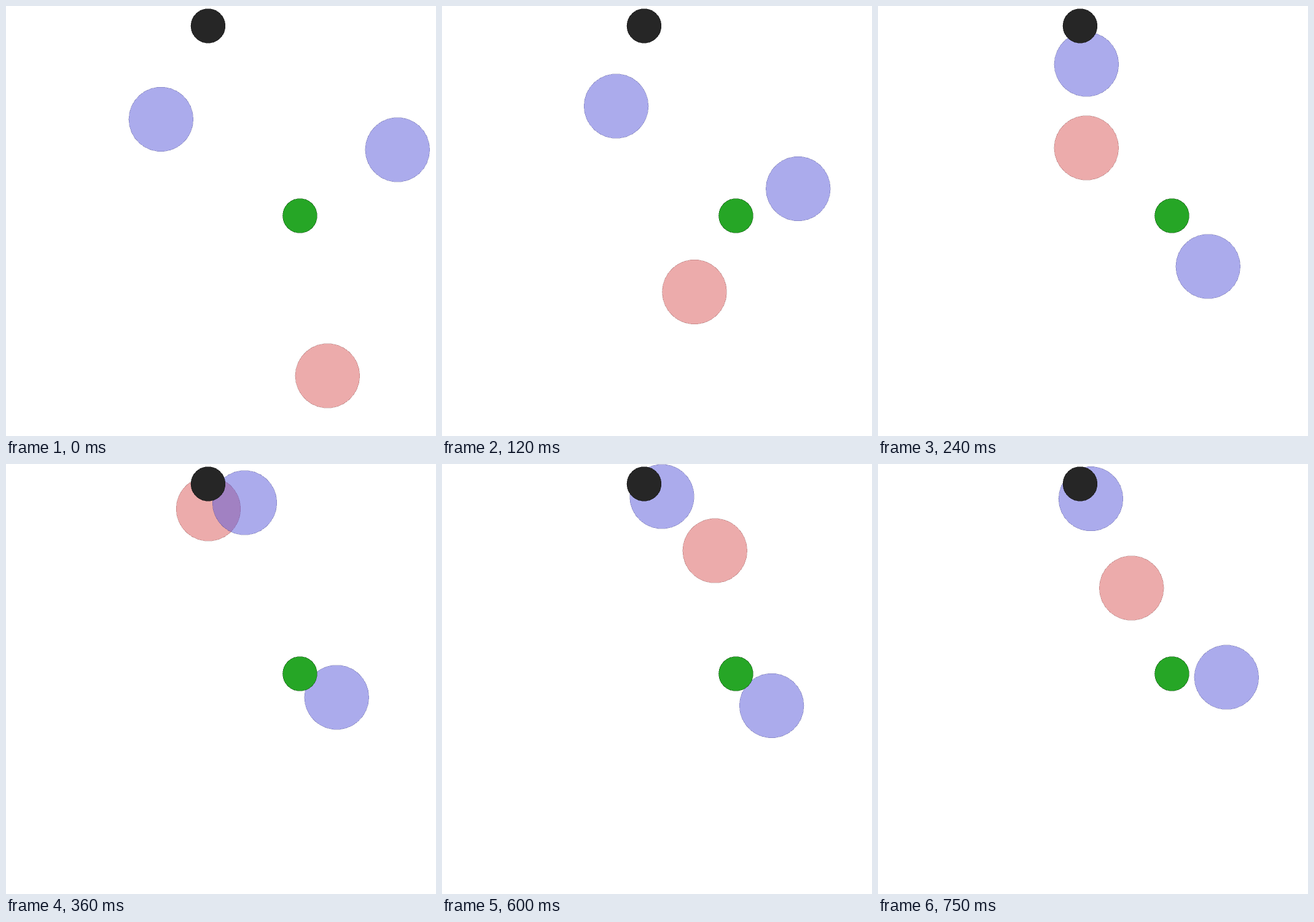
An HTML page for the animation above (780 ms loop, 700 by 700 pixels).

```html
<!DOCTYPE html>
<html lang="en">
<head>
<meta charset="utf-8">
<title>Agents and landmarks</title>
<style>
html, body { margin: 0; width: 100%; height: 100%; overflow: hidden; background: #fff; }
svg { display: block; width: 700px; height: 700px; }
</style>
</head>
<body>
<svg id="stage" viewBox="0 0 700 700" shape-rendering="crispEdges"></svg>
<script>
const stage = document.getElementById('stage');
const STEP_MS = 30, STEPS = 26, SIDES = 30;
const RED = [217, 89, 89], BLUE = [89, 89, 217], BLACK = [38, 38, 38], GREEN = [38, 166, 38];

// Disc with a rim of half the colour and half the opacity
function disc(r, color, alpha) {
  const el = document.createElementNS('http://www.w3.org/2000/svg', 'polygon');
  const corners = Array.from({ length: SIDES }, (_, i) => {
    const t = 2 * Math.PI * i / SIDES;
    return [r * Math.cos(t), r * Math.sin(t)];
  });
  const attrs = {
    points: corners.join(' '),
    fill: `rgb(${color})`, 'fill-opacity': alpha,
    stroke: `rgb(${color.map(c => c >> 1)})`, 'stroke-opacity': alpha / 2
  };
  for (const name in attrs) el.setAttribute(name, attrs[name]);
  stage.append(el);
  return (x, y) => el.setAttribute('transform', `translate(${x} ${y})`);
}

// Smooth curve through (t, p): nearly at rest at first, no force at the end
function spline(t, p) {
  const n = t.length - 1;
  const h = t.slice(1).map((v, i) => v - t[i]);
  const d = h.map((v, i) => (p[i + 1] - p[i]) / v);
  const m = [d[0] / 4, ...d];
  for (let pass = 0; pass < 40; pass++) {
    for (let i = 1; i < n; i++) {
      const a = h[i - 1], b = h[i];
      m[i] = (3 * (b * d[i - 1] + a * d[i]) - b * m[i - 1] - a * m[i + 1]) / (2 * (a + b));
    }
    m[n] = (3 * d[n - 1] - m[n - 1]) / 2;
  }
  return time => {
    let i = 0;
    while (i < n - 1 && time >= t[i + 1]) i++;
    const s = (time - t[i]) / h[i], r = 1 - s;
    return p[i] * r * r * (1 + 2 * s) + p[i + 1] * s * s * (1 + 2 * r)
      + h[i] * s * r * (m[i] * r - m[i + 1] * s);
  };
}

// Key points: step, x, y
function agent(color, ...keys) {
  const column = k => keys.map(key => key[k]);
  const x = spline(column(0), column(1)), y = spline(column(0), column(2));
  const place = disc(52.5, color, 0.5);
  return step => place(x(step), y(step));
}

const agents = [
  agent(RED, [0, 523.4, 602], [4, 411, 465.5], [8, 339.3, 231], [12, 329.5, 73],
    [16, 389.5, 65.5], [20, 444.3, 141.2], [25, 412.7, 202]),
  agent(BLUE, [0, 252.4, 184.4], [4, 283.6, 163], [8, 339.4, 95], [12, 388.5, 63],
    [16, 375, 75], [20, 358, 53], [23, 339, 52.5], [25, 346.5, 56.7]),
  agent(BLUE, [0, 637.3, 234], [4, 579.8, 297.5], [8, 537.3, 424], [12, 538.3, 379.8],
    [16, 535.4, 361.7], [20, 536.6, 393.4], [25, 567.4, 347.2])
];
disc(28, BLACK, 1)(329, 32.4);
disc(28, GREEN, 1)(478.5, 341.5);

let start;
function tick(now) {
  start ??= now;
  const step = Math.floor(Math.max(0, now - start) / STEP_MS + 0.001) % STEPS;
  agents.forEach(move => move(step));
  requestAnimationFrame(tick);
}
agents.forEach(move => move(0));
requestAnimationFrame(tick);
</script>
</body>
</html>
```
